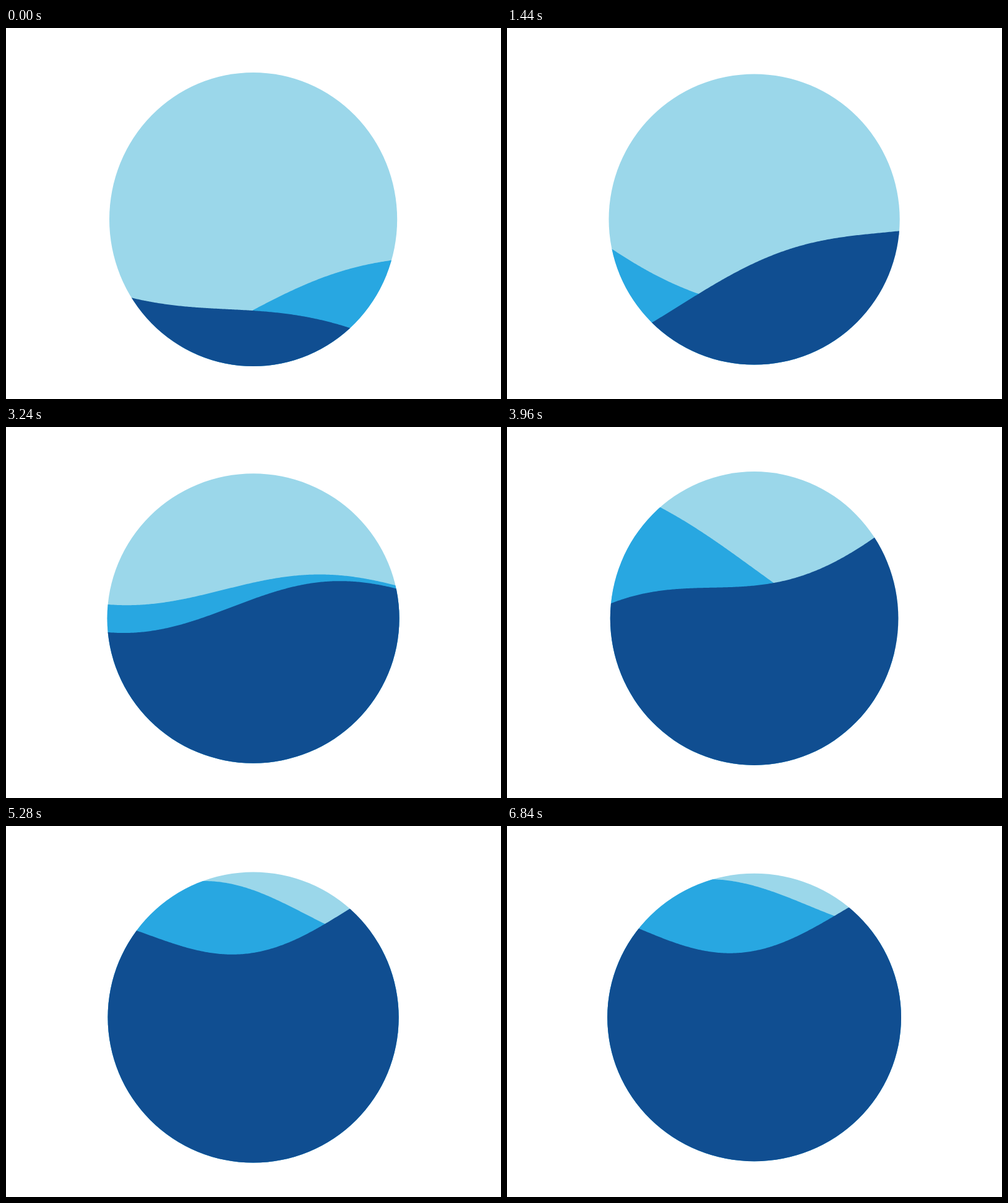
An HTML page with a canvas that plays this animation: 800 by 600 pixels, repeating every 6880 ms.

```html
<!DOCTYPE html>
<html>
<head>
<meta charset="utf-8">
<title>Rising water</title>
<style>
html, body { margin: 0; width: 100%; height: 100%; overflow: hidden; background: #fff; }
canvas { display: block; }
</style>
</head>
<body>
<canvas id="stage" width="800" height="600"></canvas>
<script>
const ctx = document.getElementById('stage').getContext('2d');
const LOOP = 6880, STEP = 40, CX = 399.6, CY = 309.5, R = 235.1;
const TAU = 2 * Math.PI, K = TAU / 650;
const times = [0, 1440, 2520, 3960, 5280, 6360, 6840];

// Each wave travels at constant speed while its level, tilt and height drift.
const back = {
  color: '#28a7e1', speed: -TAU / 1600, start: 250,
  level: [460, 444.3, 307.7, 229.7, 142, 144, 128.5],
  tilt: [-.3, .44, -.425, .505, 0, -.09, 0],
  height: [24, 27, 35, 23, 53, 49, 42.5],
  drift: [10, 4, -8, 11, -6, -7, -13]
};
const front = {
  color: '#104e91', speed: TAU / 1600, start: 245,
  level: [465.4, 405, 346, 232.9, 154, 143.6, 150.8],
  tilt: [.255, -.36, .262, -.39, -.133, -.011, -.0875],
  height: [21.2, 27.3, 33, 38.1, 51.1, 60.5, 52.2],
  drift: [2, -5.3, -2, -4.2, 3.6, -3.6, 4]
};

// Cubic interpolation through the values at the key times.
function at(values, t) {
  const last = times.length - 1;
  let i = 0;
  while (i < last - 1 && t >= times[i + 1]) i++;
  const slope = j => {
    const a = Math.max(j - 1, 0), b = Math.min(j + 1, last);
    return (values[b] - values[a]) / (times[b] - times[a]);
  };
  const d = times[i + 1] - times[i], s = (t - times[i]) / d, r = 1 - s;
  return r * r * ((1 + 2 * s) * values[i] + s * d * slope(i)) +
         s * s * ((1 + 2 * r) * values[i + 1] - r * d * slope(i + 1));
}

function drawWave(wave, t) {
  const level = at(wave.level, t), tilt = at(wave.tilt, t), height = at(wave.height, t);
  const phase = (wave.start + at(wave.drift, t)) * TAU / 360 + wave.speed * t;
  ctx.beginPath();
  ctx.moveTo(150, 600);
  for (let x = 150; x <= 650; x += 2) {
    const u = x - 400;
    ctx.lineTo(x, level + tilt * u + height * Math.cos(K * u - phase));
  }
  ctx.lineTo(650, 600);
  ctx.fillStyle = wave.color;
  ctx.fill();
}

function draw(now) {
  const t = Math.floor(now % LOOP / STEP) * STEP;
  const squash = 2.5 * Math.cos(TAU * t / 1920);
  ctx.fillStyle = '#fff';
  ctx.fillRect(0, 0, 800, 600);
  ctx.save();
  ctx.beginPath();
  ctx.ellipse(CX, CY, R - squash, R + squash, 0, 0, TAU);
  ctx.clip();
  ctx.fillStyle = '#9bd7ea';
  ctx.fillRect(0, 0, 800, 600);
  drawWave(back, t);
  drawWave(front, t);
  ctx.restore();
}

const begin = performance.now();
function tick() {
  draw(performance.now() - begin);
  requestAnimationFrame(tick);
}
tick();
</script>
</body>
</html>
```
